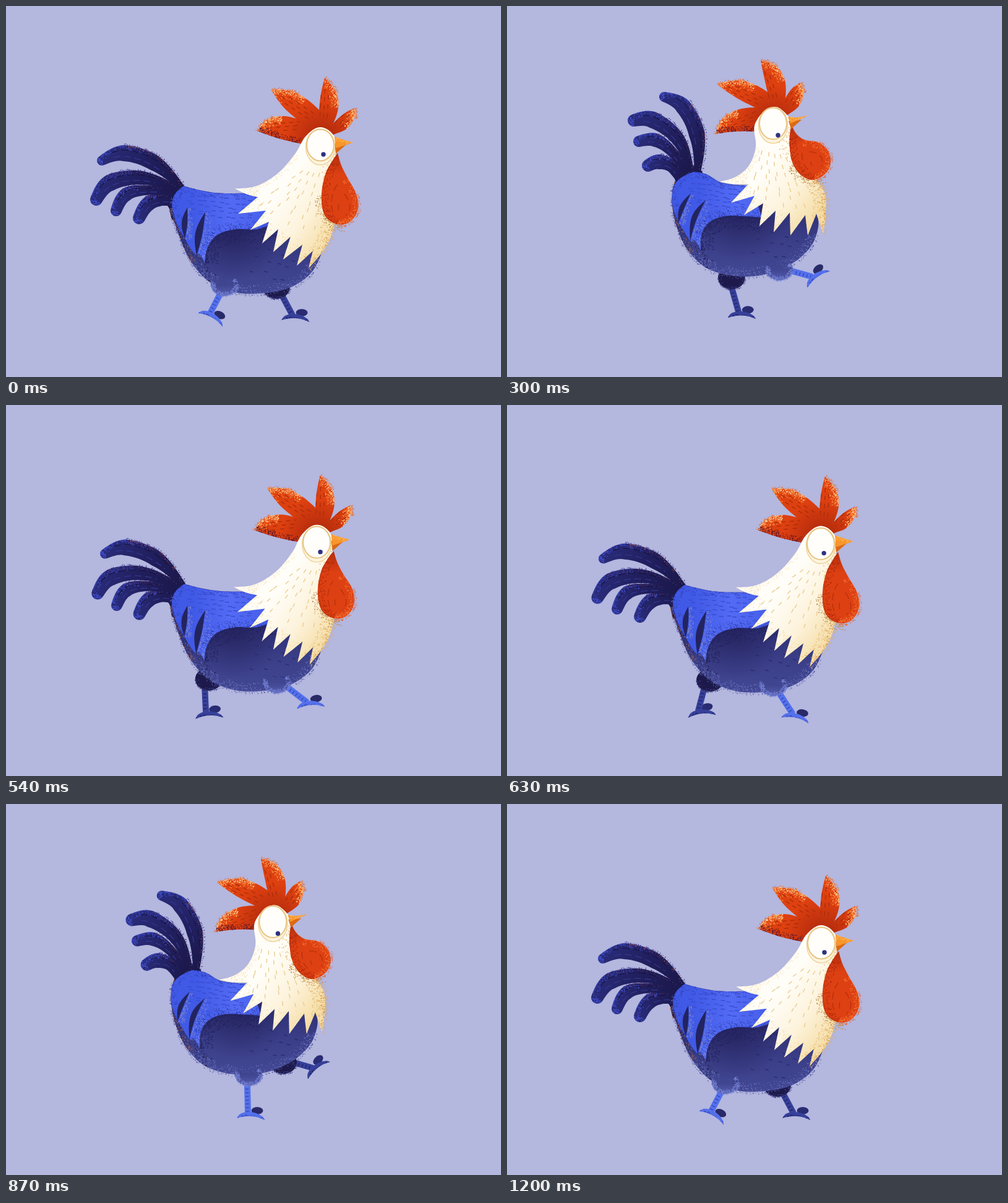
Write an HTML page with a canvas that moves like this. It is 800x600 px and loops after 1.23 s.

```html
<!DOCTYPE html>
<html lang="en">
<head>
<meta charset="utf-8">
<title>Walking rooster</title>
<style>
html,body{margin:0;width:100%;height:100%;overflow:hidden;background:#b4b7de}
canvas{display:block;width:800px;height:600px}
</style>
</head>
<body>
<canvas id="stage" width="800" height="600"></canvas>
<script>
const g = document.getElementById('stage').getContext('2d');
const K = 8; // samples per curve segment
const lerp = (a, b, k) => a + (b - a) * k;

// Seeded noise table
let seed = 7;
const noise = Array.from({length: 8192}, () => (seed = (seed * 16807) % 2147483647) / 2147483647);
const rnd = i => noise[i & 8191];

// "x,y" points; "!" marks a corner
const parse = s => s.trim().split(/\s+/).map(p => {
  const [x, y] = p.split(',').map(parseFloat);
  return {x, y, c: p.endsWith('!')};
});

// Stretched pose, upright pose, optional middle poses (going up, coming back)
function shape(low, high, mid, midBack) {
  const a = parse(low), b = parse(high);
  const m = mid ? parse(mid) : a.map((p, i) => ({x: (p.x + b[i].x) / 2, y: (p.y + b[i].y) / 2}));
  return {a, b, m, n: midBack ? parse(midBack) : m};
}

const body = shape(
  '287,291! 330,301 370,303 440,300! 505,340 515,375 505,412 488,437 455,457 410,465 370,463 330,447 300,415 281,375 269,335 271,308',
  '302,268! 322,272 348,286 400,290! 490,310 503,345 500,370 488,393 460,417 418,434 370,437 325,425 296,400 277,365 267,322 272,287');
const wing = shape(
  '287,291! 330,301 372,303 415,300! 430,352! 405,361 370,361 340,371 325,392 321,415! 313,402 307,403! 298,392 289,376! 275,350 268,318 275,300',
  '302,268! 322,272 348,286 395,290! 412,342! 385,340 350,340 325,351 314,370 313,395! 304,380 296,380! 287,366 278,351! 269,330 266,305 275,280');
const slits = [
  shape('293,326! 293,352 289,376! 284,350', '297,303! 286,328 277,351! 279,325'),
  shape('322,333! 317,370 308,404! 306,367', '321,314! 306,346 296,380! 299,340')];
const cream = shape(
  '370,295! 405,291 440,270 468,238 485,210 508,196 530,210 533,235 531,280 533,320 530,355 518,388 489,424! 496,396! 470,420! 479,386! 448,410! 460,373! 432,398! 440,361! 414,384! 425,349! 395,362! 420,331! 375,336! 407,309! 388,304',
  '344,284! 370,276 391,258 402,228 401,190 430,163 456,180 458,195 463,235 500,280 514,305 515,335 511,368! 500,336! 486,371! 482,338! 458,371! 457,334! 431,366! 434,331! 408,356! 414,319! 383,338! 400,307! 362,318! 390,288! 366,288');
const comb = shape(
  '406,202! 422,184 446,178 469,182! 447,162 429,136! 460,137 485,150 506,168! 509,142 515,116! 534,140 537,164 529,190! 545,175 563,165! 563,181 551,198 534,206! 510,215 478,223! 440,214',
  '337,207! 348,183 372,168 401,164! 370,148 340,127! 375,120 402,128 421,139! 415,113 410,88! 436,98 449,120 450,149! 460,134 474,124! 479,140 473,160 458,173! 430,190 402,203! 368,203');
const ribs = [
  shape('418,198 475,193', '348,200 405,176'),
  shape('440,143 496,180', '352,128 412,155'),
  shape('516,130 513,185', '415,102 431,150'),
  shape('557,174 532,196', '471,134 454,161')];
const beakTop = shape('531,211! 545,216 561,221! 533,230!', '454,179! 470,180 487,177! 458,190!');
const beakLow = shape('531,222! 550,224! 533,239!', '455,186! 476,184! 459,199!');
const wattle = shape(
  '536,238! 542,258 552,278 566,304 569,328 556,349 535,353 515,338 510,305 517,270 529,248',
  '460,192! 467,206 480,216 504,221 521,238 520,264 497,281 476,274 462,255 457,230 457,208',
  '497,222! 505,237 520,255 545,268 557,290 551,316 525,325 505,311 497,282 495,255 495,235',
  '495,222! 500,234 509,246 527,258 535,277 529,298 508,307 487,298 476,278 475,255 483,235');
const eye = shape('508,228 513,240', '430,193 438,209', '468,209 477,224');

// Tail plumes: centre lines from tip to root
const rump = shape('245,301 262,284 288,290! 290,340 271,347 263,326',
  '270,258 290,254 316,268! 305,290 270,304 272,280',
  '262,283 280,268 300,276! 300,312 272,327 270,303');
const plumes = [
  [shape('215,343 230,320 252,313 282,314', '228,258 245,252 266,259 288,284', '220,304 235,287 258,284 287,300'), [10, 12, 10, 12]],
  [shape('178,331 194,305 225,298 276,300', '213,219 240,217 268,237 292,270', '190,279 207,264 240,265 286,286'), [9, 11, 8, 7]],
  [shape('146,313 168,286 220,278 278,297', '205,185 235,184 276,215 297,268', '168,252 190,235 240,243 291,281'), [10, 13.5, 11, 5]],
  [shape('155,250 190,238 240,254 284,294', '254,147 284,162 307,208 308,268', '197,191 222,192 265,222 295,277'), [8, 13, 13, 5]]];

const quads = {
  neck: shape('482,262 518,268 512,385 398,318', '410,228 452,240 503,345 388,300'),
  wing: shape('288,302 292,340 395,348 400,310', '290,280 290,322 382,330 380,296'),
  belly: shape('395,372 385,435 455,452 472,402', '395,348 385,405 455,412 478,372')};

// time, hip, knee, ankle, foot angle
const nearLeg = [
  [0, 353, 450, 347, 464, 330, 497, 25], [150, 407, 436, 412, 450, 419, 461, -18],
  [300, 440, 425, 458, 428, 494, 438, -40], [450, 441, 439, 468, 446, 504, 458, -28],
  [630, 430, 452, 440, 466, 462, 500, 8], [870, 392, 437, 390, 457, 391, 500, 0],
  [1050, 358, 443, 359, 457, 363, 499, 8]];
const farLeg = [
  [0, 437, 455, 447, 470, 463, 500, 0], [150, 390, 442, 392, 456, 398, 497, 0],
  [450, 342, 440, 340, 455, 355, 495, -4], [630, 328, 445, 319, 457, 309, 495, -10],
  [750, 400, 432, 405, 440, 418, 458, -18], [870, 448, 418, 458, 416, 496, 427, -42],
  [1050, 450, 434, 466, 442, 498, 461, -22]];
const sole = smooth(parse('-18,8! -12,1 0,-2 13,0 24,6 27,11! 13,6 -2,5'), true);

let u = 0, back = false;

function ease(x) {
  let lo = 0, hi = 1;
  for (let i = 0; i < 20; i++) {
    const s = (lo + hi) / 2;
    if (1.5 * s * (1 - s) + s * s * s < x) lo = s; else hi = s;
  }
  return lo * lo * (3 - 2 * lo);
}

function pose(s) {
  const mid = back ? s.n : s.m;
  const wa = (1 - u) * (1 - 2 * u), wm = 4 * u * (1 - u), wb = u * (2 * u - 1);
  return s.a.map((p, i) => ({
    x: p.x * wa + mid[i].x * wm + s.b[i].x * wb,
    y: p.y * wa + mid[i].y * wm + s.b[i].y * wb, c: p.c}));
}

// Curve through the points, as a polyline
function smooth(pts, closed) {
  const n = pts.length, out = [];
  const sharp = i => pts[i].c || (!closed && (i === 0 || i === n - 1));
  const tangent = (i, len) => {
    const a = pts[(i + n - 1) % n], b = pts[(i + 1) % n];
    const d = Math.hypot(b.x - a.x, b.y - a.y) || 1;
    return [(b.x - a.x) / d * len, (b.y - a.y) / d * len];
  };
  for (let i = 0; i < (closed ? n : n - 1); i++) {
    const j = (i + 1) % n, p = pts[i], q = pts[j];
    const d = [q.x - p.x, q.y - p.y], len = Math.hypot(...d);
    let m = sharp(i) ? null : tangent(i, len), k = sharp(j) ? null : tangent(j, len);
    const end = t => t ? d.map((v, e) => 1.5 * v - t[e] / 2) : d;
    const m0 = m || end(k), m1 = k || end(m);
    for (let s = 0; s < K; s++) {
      const t = s / K, t2 = t * t, t3 = t2 * t;
      const h = (a, b, e) => a * (2 * t3 - 3 * t2 + 1) + b * (3 * t2 - 2 * t3) + m0[e] * (t3 - 2 * t2 + t) + m1[e] * (t3 - t2);
      out.push([h(p.x, q.x, 0), h(p.y, q.y, 1)]);
    }
  }
  if (!closed) out.push([pts[n - 1].x, pts[n - 1].y]);
  return out;
}

const outline = s => smooth(pose(s), true);

function trace(poly, open) {
  const p = new Path2D();
  poly.forEach(([x, y], i) => i ? p.lineTo(x, y) : p.moveTo(x, y));
  if (!open) p.closePath();
  return p;
}

function paint(poly, fill, inside) {
  const p = trace(poly);
  g.fillStyle = fill;
  g.fill(p);
  if (!inside) return;
  g.save();
  g.clip(p);
  inside();
  g.restore();
}

function linear(x0, y0, x1, y1, ...stops) {
  const f = g.createLinearGradient(x0, y0, x1, y1);
  stops.forEach((c, i) => f.addColorStop(i / (stops.length - 1), c));
  return f;
}

function glow(x, y, r, color, clear) {
  const f = g.createRadialGradient(x, y, 0, x, y, r);
  f.addColorStop(0, color);
  f.addColorStop(1, clear);
  g.fillStyle = f;
  g.fillRect(x - r, y - r, 2 * r, 2 * r);
}

// Stipple along the outline between two control points, thinning inwards
function grain(poly, from, to, color, count, depth, start) {
  g.fillStyle = color;
  const n = poly.length;
  for (let i = 0; i < count; i++) {
    const r = start + i * 3, s = lerp(from, to, rnd(r)) * K, e = Math.floor(s), f = s - e;
    const [ax, ay] = poly[e % n], [bx, by] = poly[(e + 1) % n];
    const dx = bx - ax, dy = by - ay, len = Math.hypot(dx, dy) || 1;
    const d = depth * rnd(r + 1) ** 2 - 1, z = 0.8 + rnd(r + 2) * 0.7;
    g.fillRect(ax + dx * f - dy / len * d, ay + dy * f + dx / len * d, z, z);
  }
}

// Rows of little dashes spread over a four-cornered patch
function ticks(quad, cols, rows, len, color, start) {
  const [a, b, c, d] = pose(quad);
  const at = (s, t, k) => lerp(lerp(a[k], b[k], s), lerp(d[k], c[k], s), t);
  g.strokeStyle = color;
  g.lineWidth = 1.4;
  g.beginPath();
  for (let i = 0; i < cols * rows; i++) {
    const s = (i % cols + 0.2 + 0.6 * rnd(start + i)) / cols;
    const t = (Math.floor(i / cols) + 0.2 + 0.6 * rnd(start + i + 99)) / rows;
    const x = at(s, t, 'x'), y = at(s, t, 'y');
    const dx = at(s, t + 0.05, 'x') - x, dy = at(s, t + 0.05, 'y') - y, l = Math.hypot(dx, dy);
    g.moveTo(x, y);
    g.lineTo(x + dx / l * len, y + dy / l * len);
  }
  g.stroke();
}

function dashes(path, color, pattern, width) {
  g.strokeStyle = color;
  g.lineWidth = width;
  g.setLineDash(pattern);
  g.stroke(path);
  g.setLineDash([]);
}

function drawPlume([line, radii], index) {
  const mid = smooth(pose(line), false), n = mid.length - 1;
  const up = [], down = [], cap = [], inner = [[], []];
  mid.forEach(([x, y], i) => {
    const p = mid[Math.max(0, i - 1)], q = mid[Math.min(n, i + 1)];
    const l = Math.hypot(q[0] - p[0], q[1] - p[1]);
    const dx = (q[0] - p[0]) / l, dy = (q[1] - p[1]) / l;
    const k = Math.min(2, Math.floor(i / K));
    const r = lerp(radii[k], radii[k + 1], i / K - k);
    up.push([x + dy * r, y - dx * r]);
    down.unshift([x - dy * r, y + dx * r]);
    inner.forEach((row, e) => row.push([x + dy * r * (e - 0.5) * 0.8, y - dx * r * (e - 0.5) * 0.8]));
    if (!i) for (let a = 1; a < 8; a++) {
      const c = Math.cos(a * Math.PI / 8) * r, s = Math.sin(a * Math.PI / 8) * r;
      cap.push([x - dy * c - dx * s, y + dx * c - dy * s]);
    }
  });
  const poly = [...up, ...down, ...cap], s = index * 700;
  const [tx, ty] = mid[0], [bx, by] = mid[n];
  paint(poly, linear(tx, ty, bx, by, '#292b78', '#211f5e', '#1b184b'), () => {
    grain(poly, 0, 1.7, '#3f4ccb', 150, 9, s);
    grain(poly, 6.2, 7, '#4352d2', 60, 9, s + 200);
    grain(poly, 1, 3, index === 3 ? '#9b4c4b' : '#57335f', 80, 6, s + 300);
    inner.forEach((row, e) => dashes(trace(row.slice(4, 20), true), e ? '#15133f' : '#333791', [11, 6], 1.2));
  });
  grain(poly, 1, 3, '#373a92', 45, -2, s + 410);
}

function drawTail() {
  const base = outline(rump);
  paint(base, '#1c1a4d');
  grain(base, 3, 5, '#a5623f', 40, 6, 60);
  plumes.forEach(drawPlume);
}

function drawBody() {
  const b = outline(body), w = outline(wing);
  const [cx, cy] = b[9 * K];
  paint(b, linear(cx, cy - 110, cx, cy, '#2e2f73', '#3a3e87', '#434894'), () => {
    glow(cx - 40, cy - 95, 75, 'rgba(32,28,84,.6)', 'rgba(32,28,84,0)');
    grain(b, 6, 12, '#6b72bd', 520, 16, 900);
    grain(b, 12, 15, '#b06a4c', 170, 9, 2500);
    grain(b, 11, 15, '#20204f', 260, 18, 3100);
    grain(w, 4, 9, '#22215c', 520, -20, 3900);
    paint(w, linear(cx - 110, 0, cx + 15, 0, '#4059e6', '#536bf4', '#455de9'), () => {
      grain(w, 0, 3, '#2f3fb8', 160, 10, 5000);
      grain(w, 4, 8, '#2c39ab', 330, 15, 5500);
      grain(w, 13, 17, '#3040b5', 160, 12, 6500);
      grain(w, 7, 10, '#7286f8', 140, 14, 7000);
      ticks(quads.wing, 5, 9, 7, '#384cd0', 40);
    });
    slits.forEach((s, i) => {
      const p = outline(s);
      paint(p, '#23245f');
      grain(p, 0, 2, '#8089ca', 100, -9 - i * 2, 400 + i * 600);
    });
    ticks(quads.belly, 3, 4, 6, '#292a6c', 300);
  });
  grain(b, 6, 15, '#565ba9', 180, -3, 1500);
}

function drawComb() {
  const c = outline(comb);
  const [hx, hy] = c[19 * K];
  paint(c, '#de4010', () => {
    glow(hx, hy, 62, 'rgba(150,28,10,.75)', 'rgba(150,28,10,0)');
    [[0, 2], [5, 7], [10, 12], [15, 17]].forEach(([a, b], i) => {
      grain(c, a, b, '#ff9a48', 170, 15, i * 900);
      grain(c, a, b, '#ffe2a6', 90, 8, i * 900 + 520);
    });
    grain(c, 4.2, 5, '#ffab58', 40, 9, 200);
    grain(c, 20, 22, '#4d1432', 240, 11, 5200);
    g.strokeStyle = '#a92a0a';
    ribs.forEach((r, i) => {
      const [a, b] = pose(r), l = Math.hypot(b.x - a.x, b.y - a.y);
      const nx = (a.y - b.y) / l, ny = (b.x - a.x) / l;
      [-6, 0, 6].forEach((o, j) => {
        const k = o ? 0.25 : 0.08;
        dashes(trace([[lerp(a.x, b.x, k) + nx * o, lerp(a.y, b.y, k) + ny * o], [b.x + nx * o, b.y + ny * o]], true),
          '#aa2d0b', [7, 6 + (i + j) % 3], 1.4);
      });
    });
  });
  [[0, 1.5], [5, 6.5], [10, 11], [15, 16]].forEach(([a, b], i) => grain(c, a, b, '#e9773f', 40, -3, i * 310));
}

function drawNeck() {
  const c = outline(cream);
  const [rx, ry] = c[10 * K];
  paint(c, linear(rx - 85, ry - 55, rx + 5, ry + 10, '#fffdf7', '#fdf3dc', '#f5dda6'), () => {
    grain(c, 7, 12, '#e2b368', 480, 22, 700);
    grain(c, 9, 12, '#d79447', 130, 9, 2300);
    grain(c, 12, 26, '#f2dca8', 420, 18, 2900);
    grain(c, 0, 3, '#f3e2bd', 120, 9, 4300);
    ticks(quads.neck, 5, 7, 7, '#e9cd94', 500);
  });
  grain(c, 9, 12, '#dcae6a', 70, -4, 4800);
}

function drawWattle() {
  const pts = pose(wattle), w = smooth(pts, true);
  const mean = k => pts.slice(3, 9).reduce((s, p) => s + p[k], 0) / 6;
  const cx = mean('x'), cy = mean('y');
  grain(w, 5.5, 8, '#b98a4c', 110, -10, 5100);
  paint(w, '#dd4012', () => {
    glow(pts[0].x, pts[0].y, 34, 'rgba(150,30,12,.6)', 'rgba(150,30,12,0)');
    grain(w, 2, 6, '#f57a36', 260, 11, 300);
    grain(w, 6, 10, '#ad2a0d', 280, 12, 1300);
    [[2, 5, 0.5], [7, 10, 0.5], [7, 9, 0.15]].forEach(([a, b, k]) => {
      const row = pts.slice(a, b + 1).map(p => ({x: lerp(cx, p.x, k), y: lerp(cy, p.y, k)}));
      dashes(trace(smooth(row, false), true), '#b5300d', [12, 6], 1.3);
    });
  });
  grain(w, 3, 6, '#e8683a', 60, -3, 2500);
}

function disc(x, y, rx, ry, fill, stroke, width) {
  g.beginPath();
  g.ellipse(x, y, rx, ry, 0, 0, 7);
  g.fillStyle = fill;
  g.fill();
  if (!stroke) return;
  g.strokeStyle = stroke;
  g.lineWidth = width;
  g.stroke();
}

function drawFace() {
  paint(outline(beakLow), '#dc6a14');
  const t = outline(beakTop);
  paint(t, '#f8962c', () => grain(t, 0, 2, '#ffc469', 50, 6, 10));
  const [e, p] = pose(eye);
  disc(e.x, e.y, 23.5, 29, '#fdf4de', '#eed39a', 1.4);
  disc(e.x, e.y - 3, 22, 25.5, '#fffefb', '#e7c584', 2);
  disc(p.x, p.y, 3.7, 3.7, '#2d3180');
}

// Periodic spline over the leg keys
function track(keys, t) {
  const n = keys.length, P = 1200;
  const key = i => {
    const k = keys[(i + n) % n];
    return [k[0] + P * Math.floor(i / n), ...k.slice(1)];
  };
  let i = n - 1;
  while (keys[i][0] > t) i--;
  const [a, b, c, d] = [key(i - 1), key(i), key(i + 1), key(i + 2)];
  const h = c[0] - b[0], s = (t - b[0]) / h, s2 = s * s, s3 = s2 * s;
  return b.map((v, k) => {
    const m0 = (c[k] - a[k]) / (c[0] - a[0]) * h, m1 = (d[k] - v) / (d[0] - b[0]) * h;
    return v * (2 * s3 - 3 * s2 + 1) + c[k] * (3 * s2 - 2 * s3) + m0 * (s3 - 2 * s2 + s) + m1 * (s3 - s2);
  });
}

function drawLeg(keys, t, near) {
  const [, hx, hy, kx, ky, ax, ay, turn] = track(keys, t);
  const skin = near ? '#5470ec' : '#36409a', dark = near ? '#3245b4' : '#20215f';
  g.save();
  g.translate(ax, ay);
  g.rotate(turn * Math.PI / 180);
  disc(15, -4, 9.5, 6, near ? '#292a68' : '#292c72');
  g.restore();

  const l = Math.hypot(ax - kx, ay - ky) || 1, dx = (ax - kx) / l, dy = (ay - ky) / l;
  g.lineCap = 'butt';
  g.lineWidth = 10;
  g.strokeStyle = skin;
  g.beginPath();
  g.moveTo(kx - dx * 8, ky - dy * 8);
  g.lineTo(ax, ay);
  g.stroke();
  g.strokeStyle = dark;
  g.lineWidth = 1.3;
  g.beginPath();
  for (let d = 4; d < l - 3; d += 6) {
    const x = kx + dx * d, y = ky + dy * d;
    g.moveTo(x - dy * 3.5, y + dx * 3.5);
    g.lineTo(x + dy * 2, y - dx * 2);
  }
  g.stroke();

  g.save();
  g.translate(ax, ay);
  g.rotate(turn * Math.PI / 180);
  paint(sole, skin, () => grain(sole, 5, 8, dark, 50, 4, 800));
  g.restore();

  const thigh = Array.from({length: 4 * K}, (_, i) => {
    const a = i / (4 * K) * Math.PI * 2;
    return [hx + Math.cos(a) * 22, hy + Math.sin(a) * 18.5];
  });
  if (near) {
    paint(thigh, linear(0, hy - 16, 0, hy + 18, 'rgba(61,66,143,0)', '#40458f', '#535bad'), () =>
      grain(thigh, -0 + 3.6, 6.2, '#7b88dc', 190, 8, 4000));
    grain(thigh, 0, 2, '#7380d2', 150, 8, 4600);
  } else {
    paint(thigh, '#1d1a4b');
    grain(thigh, 0, 2, '#3b3c83', 80, 6, 4200);
  }
}

function draw(ms) {
  const t = Math.floor(ms % 1230 / 30) * 30 % 1200;
  const phase = (t + 597) % 600;
  back = phase >= 300;
  u = ease((back ? 600 - phase : phase) / 300);
  g.fillStyle = '#b4b7de';
  g.fillRect(0, 0, 800, 600);
  drawLeg(farLeg, t, false);
  drawTail();
  drawBody();
  drawComb();
  drawNeck();
  drawLeg(nearLeg, t, true);
  drawWattle();
  drawFace();
}

const start = performance.now();
function tick() {
  draw(performance.now() - start);
  requestAnimationFrame(tick);
}
tick();
</script>
</body>
</html>
```
